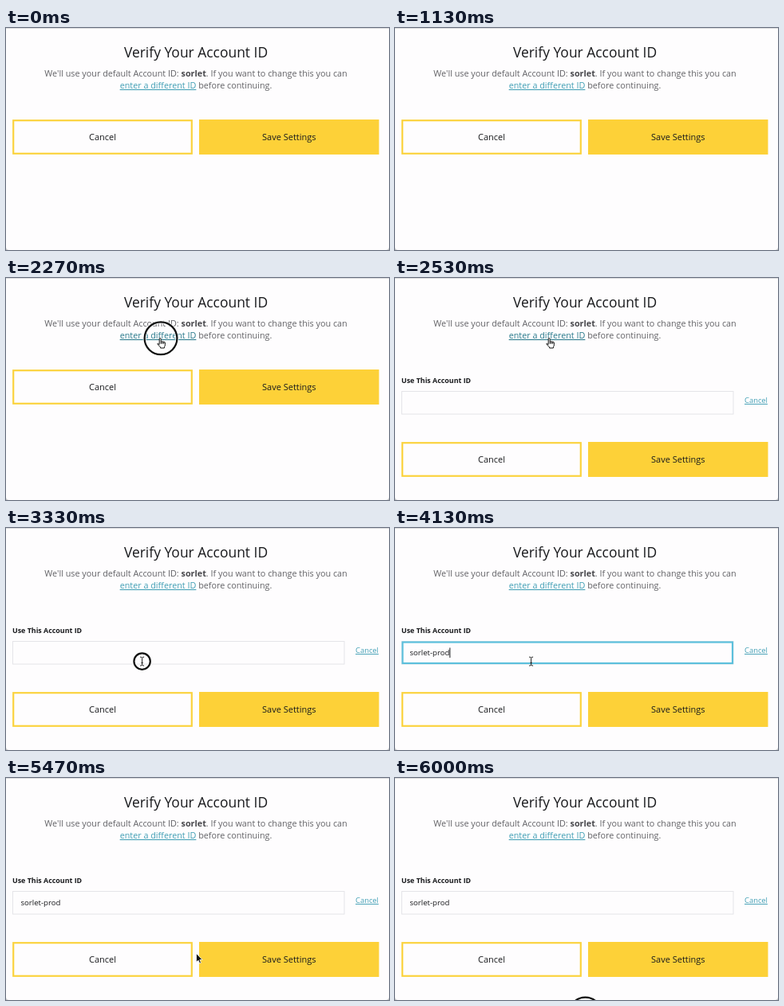
Animation, 480 px wide and 279 px high, one loop 6.07 s. Source, as an HTML page:

```html
<!DOCTYPE html>
<html lang="en">
<head>
<meta charset="utf-8">
<title>Verify Your Account ID</title>
<style>
  html, body { margin: 0; width: 100%; height: 100%; overflow: hidden; background: #c4c4c6; }
  svg { display: block; width: 480px; height: 279px; }
  text { font-family: "Open Sans", "Noto Sans", sans-serif; fill: #18191c; }
  .mid { text-anchor: middle; }
  .title { font-size: 17.45px; }
  .copy { font-size: 10.8px; fill: #626266; }
  .copy .id { font-weight: 700; fill: #48484c; }
  .btn { font-size: 11px; }
  .label { font-size: 8.9px; font-weight: 700; }
  .value { font-size: 9.6px; font-weight: 500; }
  .small { font-size: 9.4px; }
  .link { fill: #429fb5; text-decoration: underline; }
  .link.hover { fill: #2a7a8c; }
</style>
</head>
<body>
<svg viewBox="0 0 480 279">
  <rect width="480" height="284" y="-5" rx="4" fill="#fefdfe"/>
  <path d="M0 .5H480" stroke="#dedee0"/>

  <text class="title mid" x="238" y="37">Verify Your Account ID</text>
  <text class="copy mid" x="238" y="61">We'll use your default Account ID: <tspan class="id">sorlet</tspan>. If you want to change this you can</text>
  <text class="copy mid" x="238" y="76"><tspan class="link" id="change">enter a different ID</tspan> before continuing.</text>

  <g id="form">
    <text class="label" x="8" y="132">Use This Account ID</text>
    <rect x="8.5" y="142.5" width="415.5" height="28.5" fill="#fefdfe" stroke="#e4e4e8"/>
    <rect id="focus" x="9.5" y="143.5" width="413.5" height="26.5" fill="none" stroke="#5cc0dc" stroke-width="2.2"/>
    <text class="value" id="value" x="18.5" y="160"></text>
    <path id="caret" d="M0 150.5V163" stroke="#18191c"/>
    <text class="small link" x="438" y="157">Cancel</text>
  </g>

  <g id="buttons">
    <rect x="9.2" y="116.2" width="223.6" height="41.6" fill="#fefdfe" stroke="#fbd33f" stroke-width="2.2"/>
    <rect x="242" y="115" width="225.5" height="44" fill="#fdd138"/>
    <text class="btn mid" x="121" y="141">Cancel</text>
    <text class="btn mid" x="354.8" y="141">Save Settings</text>
  </g>

  <g id="pointer" stroke-linejoin="round">
    <g id="ring" fill="none">
      <circle stroke="#fff" stroke-opacity=".7" stroke-width="4.4"/>
      <circle stroke="#111" stroke-width="2.2"/>
    </g>
    <path id="arrow" d="M0 0V11L2.5 8.7L4.2 12.6L6 11.8L4.4 8H7.6Z" fill="#111" stroke="#fff" stroke-width=".8"/>
    <path id="hand" transform="translate(-.8 0)" d="M-1 7V.8a1 1 0 0 1 2 0V4.4q1-.8 1.8 0q1-.6 1.8.2q1.4-.4 1.6.8V8q0 1.5-1 3v1.2H.4v-1Q-2 9-3.4 7q0-1.6 2.4.8ZM1 4.4V7M2.8 4.4V7M4.6 4.6V7" fill="#fff" stroke="#111"/>
    <path id="beam" d="M-2.5-5.5Q0-5.5 0-4.2Q0-5.5 2.5-5.5M0-4.2V4.2M-2.5 5.5Q0 5.5 0 4.2Q0 5.5 2.5 5.5M-1.2 1.8H1.2" fill="none" stroke="#222"/>
  </g>
</svg>
<script>
  const LOOP = 6070, FPS = 15;
  const ID = "sorlet-prod";

  // Ticks of 1/15 s
  const OPEN = 35, FOCUS = 51, TYPE = 58, BLUR = 73;
  const CLICKS = [31, 49, 71, 87];
  // [from tick, to tick, from point, to point]
  const MOVES = [
    [19, 29, [64, -14], [194, 75.8]],
    [41, 47, [194, 75.8], [170.6, 167.6]],
    [67, 71, [170.6, 167.6], [238.5, 104]],
    [78, 85, [238.5, 104], [238.5, 296]]
  ];

  const $ = id => document.getElementById(id);
  const show = (id, on) => $(id).style.visibility = on ? "visible" : "hidden";
  const clamp = x => Math.max(0, Math.min(1, x));
  const ease = x => x * x * (3 - 2 * x);
  const inside = ([x, y], l, t, r, b) => x >= l && x <= r && y >= t && y <= b;

  function position(n) {
    const [a, b, p, q] = MOVES.filter(m => n >= m[0]).pop() || MOVES[0];
    const k = ease(clamp((n - a) / (b - a)));
    return p.map((v, i) => v + (q[i] - v) * k);
  }

  function drawPointer(n, open) {
    const at = position(n);
    const onLink = inside(at, 142, 66, 238, 79);
    const onField = open && inside(at, 8, 143, 424, 171);
    $("pointer").setAttribute("transform", `translate(${at})`);
    show("hand", onLink);
    show("beam", onField);
    show("arrow", !onLink && !onField);
    $("change").classList.toggle("hover", onLink);

    const click = CLICKS.find(c => n >= c && n < c + 4);
    show("ring", click !== undefined);
    if (click !== undefined) {
      for (const circle of $("ring").children) circle.setAttribute("r", 5.1 * (n - click + 1));
    }
  }

  function drawForm(n, open) {
    const focused = n >= FOCUS && n < BLUR;
    $("form").style.display = open ? "" : "none";
    $("buttons").setAttribute("transform", `translate(0 ${open ? 91 : 0})`);
    $("focus").style.opacity = focused ? clamp((n - FOCUS + 1) / 3) : 0;

    const typed = n < TYPE ? 0 : Math.min(ID.length, (n - TYPE) * 2 + 3);
    $("value").textContent = ID.slice(0, typed);
    const width = open && typed ? $("value").getComputedTextLength() : 0;
    $("caret").setAttribute("transform", `translate(${18.5 + width + .5})`);
    const blinkFrom = n < TYPE ? FOCUS : TYPE + 4;
    show("caret", focused && (n - blinkFrom) % 15 < 8);
  }

  function draw(ms) {
    const n = Math.floor((ms + 5) * FPS / 1000);
    const open = n >= OPEN;
    drawForm(n, open);
    drawPointer(n, open);
  }

  const start = performance.now();
  function tick() {
    draw((performance.now() - start) % LOOP);
    requestAnimationFrame(tick);
  }
  tick();
</script>
</body>
</html>
```
